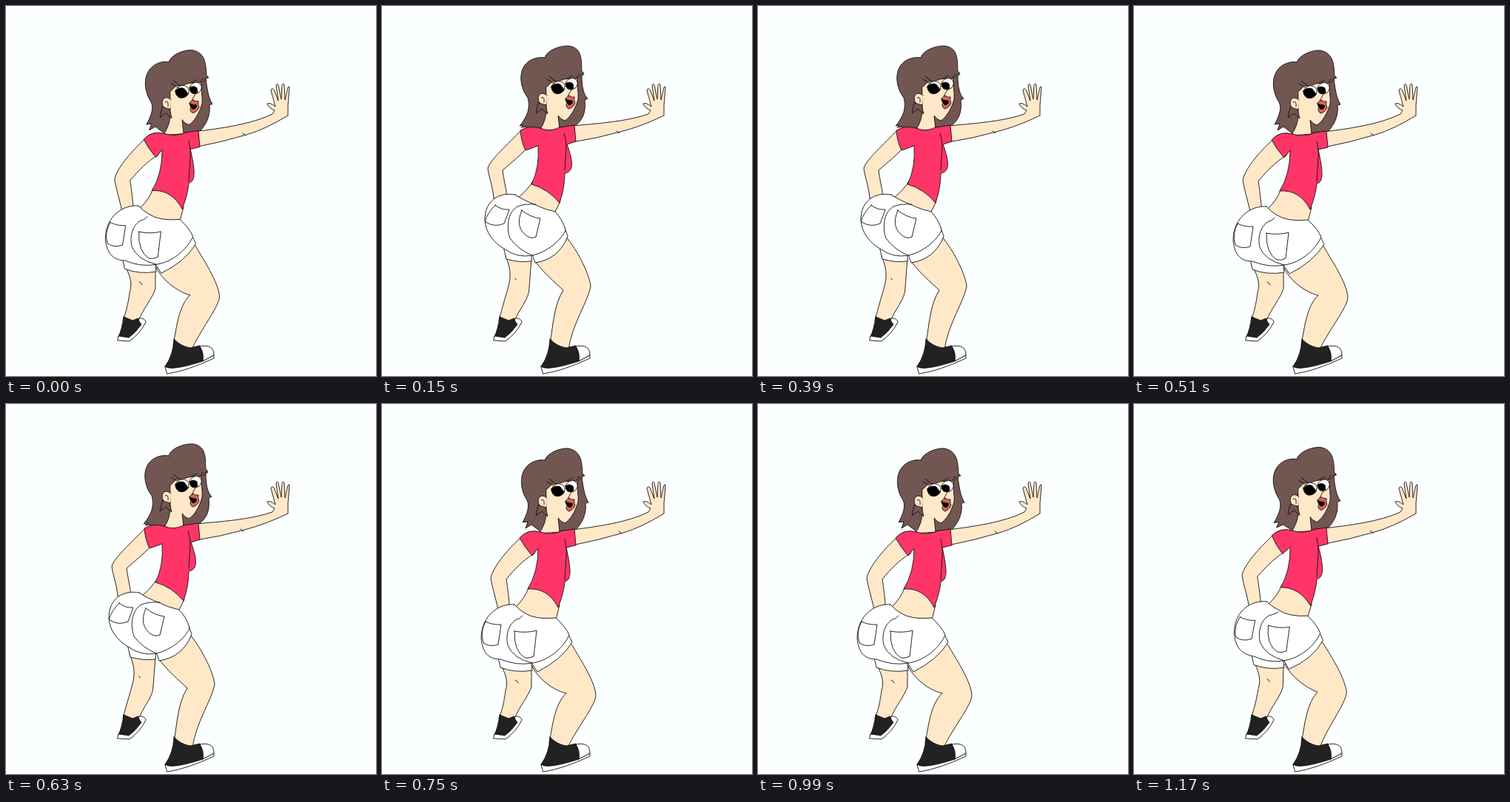
These frames come from a looping animation (500 by 500 pixels, 1.2 s). An HTML page:

```html
<!DOCTYPE html>
<html lang="en">
<head>
<meta charset="utf-8">
<title>Dance loop</title>
<style>
  html, body { margin: 0; height: 100%; overflow: hidden; background: #fcffff; }
  svg { display: block; width: 100vw; height: 100vh; }
  path { stroke: #15100f; stroke-width: .9; stroke-linejoin: round; stroke-linecap: round; }
</style>
</head>
<body>
<svg id="stage" viewBox="0 0 500 500"></svg>
<script>
const skin = '#ffe8c8', hair = '#715652', pink = '#ff3568', white = '#fff', ink = '#222';
const BEAT = 240, STEP = 30, LIFT = 6;
const stage = document.getElementById('stage');
const moving = [];

function add(parent, tag, attributes) {
  const node = document.createElementNS('http://www.w3.org/2000/svg', tag);
  for (const name in attributes) node.setAttribute(name, attributes[name]);
  return parent.appendChild(node);
}

// A part with a second path morphs from the low pose to the high pose.
function part(fill, low, high, parent = stage) {
  const node = add(parent, 'path', { fill, d: low });
  if (high) moving.push({ node, low, high: high.match(/[\d.]+/g) });
}

// Left arm
part(skin,
  'M187 181C174 193 151 217 147 235C149 248 153 260 157 278L173 278C171 262 170 248 168 237C179 223 192 210 206 202Z',
  'M188 168C171 186 146 208 143 219C144 231 150 244 151 260L169 260C168 246 164 233 163 222C174 212 185 204 195 193Z');

// Back leg and shoe
part(skin,
  'M162 355C169 370 170 377 167 387C165 402 163 412 158 425L178 427C187 406 198 395 202 382Q202 372 202 358Z',
  'M167 338C173 352 175 364 171 378C166 397 162 408 158 425L179 427C184 410 199 397 199 381Q200 365 202 342Z');
part('none', 'M180 373Q183 374 184 377', 'M180 368Q181 369 181 370');
part(ink, 'M159 420L171 425L179 422L184 430L166 449L152 447Q157 436 159 420Z');
part(white, 'M152 446L166 448Q176 441 183 430Q178 425 180 422Q187 421 189 427Q181 443 167 453L151 452Z');

// Front leg and shoe
part(skin,
  'M254 321C266 342 288 374 289 394C288 408 262 440 251 464L226 458C231 430 234 405 249 391C235 388 214 375 203 355Z',
  'M248 311C266 332 281 365 282 379C278 400 257 430 252 464L227 458C231 430 233 402 245 384C234 374 216 358 206 344Z');
part(ink, 'M227 450Q236 460 249 462L262 459Q267 470 266 481Q240 488 217 491L215 487Q226 472 227 450Z');
part(white, 'M262 460Q281 456 281 472L266 480Q268 469 262 460Z');
part(white, 'M215 487Q222 494 266 480L281 472L281 476Q245 493 218 497Z');

// Waist
part(skin,
  'M198 248Q194 262 179 276L205 292L235 291L240 272L220 245Z',
  'M203 238Q197 248 184 259L210 276L233 280L241 264L220 235Z');

// Shorts: cuffs, seat, seam, pockets
part(white,
  'M157 343L160 356Q180 364 203 360L201 345Z',
  'M164 325L168 342Q185 347 202 345L202 330Z');
part(white,
  'M250 308L257 322Q242 346 210 362L202 350Z',
  'M246 298L251 311Q239 342 207 347L202 333Z');
part(white,
  'M179 271C159 269 134 285 134 317C136 338 146 345 160 345Q183 354 203 350C225 347 245 330 253 312Q248 301 235 289Q207 292 192 282Q184 277 179 271Z',
  'M180 255C159 251 139 262 139 289C140 306 150 319 165 328Q183 341 203 337C225 332 243 315 248 303Q245 290 234 278Q220 275 208 269Q190 262 180 255Z');
part('none',
  'M190 286Q186 291 182 291C170 298 167 314 170 326Q177 344 203 350',
  'M208 268Q192 267 183 271C169 279 168 301 173 314Q185 330 203 337');
part('none',
  'M179 307Q195 310 209 306L205 341Q200 344 193 343Q178 334 179 307Z',
  'M189 276Q201 286 214 287L208 312Q202 315 196 311Q179 299 189 276Z');
part('none',
  'M140 294Q150 299 161 298L157 325Q146 329 137 323Q132 308 140 294Z',
  'M153 269Q161 276 172 275L165 294Q151 300 139 291Q143 279 153 269Z');

// Hair
part(hair,
  'M220 76C223 66 241 59 252 60C271 64 270 82 271 94L274 97L270 98C272 114 274 125 279 133L275 134C277 150 269 162 262 170L215 173L202 163L194 168L197 159L190 160C196 149 200 138 196 130C184 112 184 82 211 76Q217 75 220 76Z',
  'M220 70C222 60 241 53 253 54C272 57 269 76 270 88L273 92L270 94C270 110 273 121 278 125L274 127C276 146 270 155 261 162L215 167L200 163L188 164L192 161L186 162C196 150 201 138 197 124C183 106 183 75 210 70Q216 69 220 70Z');

// Neck and head details move together.
const head = add(stage, 'g', {});
const face = (fill, d) => part(fill, d, null, head);
face(skin, 'M222 116L230 108L237 108L246 105L264 103C263 114 266 123 265 132C261 146 254 157 247 161Q241 159 238 154L240 173L212 175Q222 162 222 146Z');
face(skin, 'M223 127C215 120 209 127 212 135Q216 143 222 139');
face('none', 'M215 130Q220 127 219 136');
face(hair, 'M211 137L208 151L216 145L224 152L221 140Z');
face(white, 'M229 115C233 105 245 106 247 114C248 122 240 126 234 124Q229 121 229 115Z');
face('#000', 'M229 115Q234 109 241 112L246 119Q242 126 234 124Q229 121 229 115Z');
face(white, 'M248 111C251 102 262 101 264 109C265 116 258 121 252 118Q248 115 248 111Z');
face('#000', 'M248 111Q253 107 258 111L259 117Q255 120 251 118Q248 115 248 111Z');
face('none', 'M223 105L233 111M226 101L235 108M250 104L258 100M262 105L266 98M266 103L272 96');
face('none', 'M256 119L251 128L254 128');
face('#df6258', 'M248 131L253 127L256 129L260 129Q259 134 261 137Q258 144 252 145Q247 141 250 137Z');
face('#000', 'M248 132Q253 134 257 134Q259 138 253 140Q248 136 248 132Z');

// Right arm and hand
const fingers = 'L363 141Q355 138 353 132Q357 130 364 136L358 114Q359 110 362 113L368 128L365 108Q366 103 368 107L372 126L373 107Q375 103 376 107L377 127L381 110Q383 107 383 111L381 134L381 148';
part(skin,
  'M256 170C290 166 332 160 360 146' + fingers + 'Q350 167 326 174Q293 184 257 191Z',
  'M256 162C290 159 332 156 360 146' + fingers + 'Q350 163 322 170Q290 179 257 184Z');
part('none', 'M320 172L324 175', 'M317 169L321 172');

// Shirt
part(pink,
  'M214 173Q197 168 186 181Q193 194 203 205L211 195Q211 227 197 250Q224 248 238 275Q246 254 247 240C256 238 256 225 249 194L262 191L260 169L245 171Q228 178 214 173Z',
  'M214 165Q199 161 187 168Q188 183 194 195L211 189Q213 219 202 241Q224 247 240 266Q247 245 247 226C259 224 259 211 250 187L262 183L260 161L240 164Q226 171 214 165Z');
part('none', 'M247 183Q250 195 249 205L247 238', 'M246 172Q249 180 249 190L247 222');

function heightAt(ms) {
  const phase = (Math.floor(ms / STEP) * STEP + BEAT * 7 / 8) % BEAT / (BEAT / 2);
  if (phase < 1) return (1 - Math.cos(Math.PI * phase)) / 2;
  return (2 - phase) ** 2;
}

function draw(now) {
  const k = heightAt(now);
  for (const { node, low, high } of moving) {
    let i = 0;
    node.setAttribute('d', low.replace(/[\d.]+/g, n => +n + (high[i++] - n) * k));
  }
  head.setAttribute('transform', `translate(0 ${-LIFT * k})`);
}

const start = performance.now();
function tick() {
  draw(performance.now() - start);
  requestAnimationFrame(tick);
}
tick();
</script>
</body>
</html>
```
